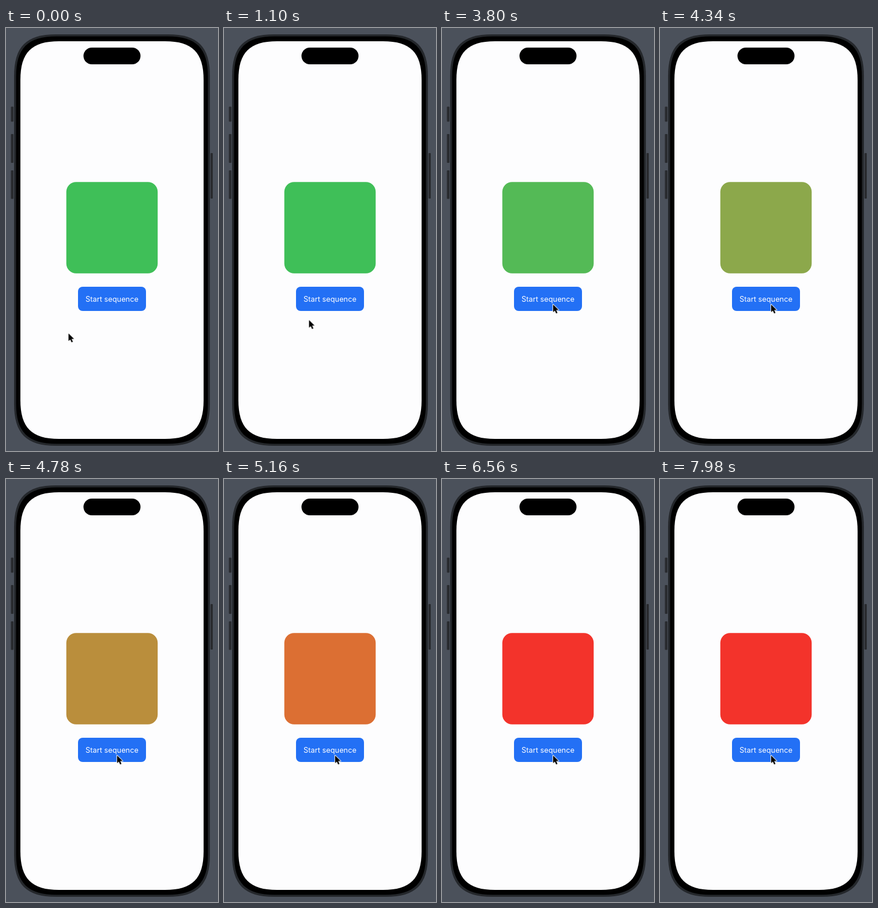
Recreate the animation shown at these times as an HTML page. Size 368 by 734 pixels, loop 8000 ms.

```html
<!DOCTYPE html>
<html lang="en">
<head>
<meta charset="utf-8">
<title>Start sequence</title>
<style>
  html, body {
    margin: 0;
    width: 100%;
    height: 100%;
    overflow: hidden;
    background: #4b515b;
  }
  svg { display: block; width: 368px; height: 734px; }
  text { font: 400 12.8px Inter, "Open Sans", sans-serif; fill: #fff; text-anchor: middle; }

  .box { fill: #3fbf58; animation: blend 8s linear infinite; }
  .cursor { animation: approach 8s linear infinite; }

  /* Green to red, eased and blended in linear light */
  @keyframes blend {
    0%, 43.25% { fill: #3fbf58; }
    47.5% { fill: #54ba56; }
    52.5% { fill: #7caf50; }
    56.25% { fill: #9fa046; }
    59.75% { fill: #ba8e3c; }
    63.75% { fill: #d97434; }
    68.5% { fill: #ec522c; }
    74.5%, 100% { fill: #f3332b; }
  }
  @keyframes approach {
    0%, 8.5% { transform: translate(108.5px, 530px); animation-timing-function: ease-in-out; }
    19.5%, 100% { transform: translate(192.8px, 479.8px); }
  }
</style>
</head>
<body>
<svg viewBox="0 0 368 734">
  <g fill="#292b2f">
    <rect x="8.5" y="136.5" width="4.5" height="26" rx="1"/>
    <rect x="8.5" y="184" width="4.5" height="50" rx="1"/>
    <rect x="8.5" y="247" width="4.5" height="49.5" rx="1"/>
    <rect x="355" y="217" width="4" height="79" rx="1"/>
  </g>
  <g id="phone"></g>
  <rect x="134.5" y="34" width="99" height="29" rx="14.5"/>
  <rect class="box" x="104.7" y="267.2" width="158.6" height="158.6" rx="17"/>
  <rect x="125" y="449" width="118" height="42" rx="8" fill="#2370f5"/>
  <text x="184" y="475">Start sequence</text>
  <g class="cursor">
    <path d="M0 0V13.2L3 10.5L5.3 15.6L7.6 14.6L5.4 9.6H9.6Z"
          stroke="#fff" stroke-width="2" stroke-linejoin="round" paint-order="stroke"/>
  </g>
</svg>
<script>
  const phone = document.getElementById("phone");

  // Rounded rectangle with continuous corners; `reach` is the corner length.
  function addShell(left, top, right, bottom, reach, color) {
    const c = reach * 0.29;
    const path = document.createElementNS("http://www.w3.org/2000/svg", "path");
    path.setAttribute("d", `M${left + reach} ${top}H${right - reach}
      C${right - c} ${top} ${right} ${top + c} ${right} ${top + reach}V${bottom - reach}
      C${right} ${bottom - c} ${right - c} ${bottom} ${right - reach} ${bottom}H${left + reach}
      C${left + c} ${bottom} ${left} ${bottom - c} ${left} ${bottom - reach}V${top + reach}
      C${left} ${top + c} ${left + c} ${top} ${left + reach} ${top}Z`);
    path.setAttribute("fill", color);
    phone.append(path);
  }

  addShell(14, 11, 354, 725, 73, "#24272b");
  addShell(17.5, 14.5, 350.5, 721.5, 70, "#000");
  addShell(25, 23, 343, 713, 67, "#fdfdfe");
</script>
</body>
</html>
```
